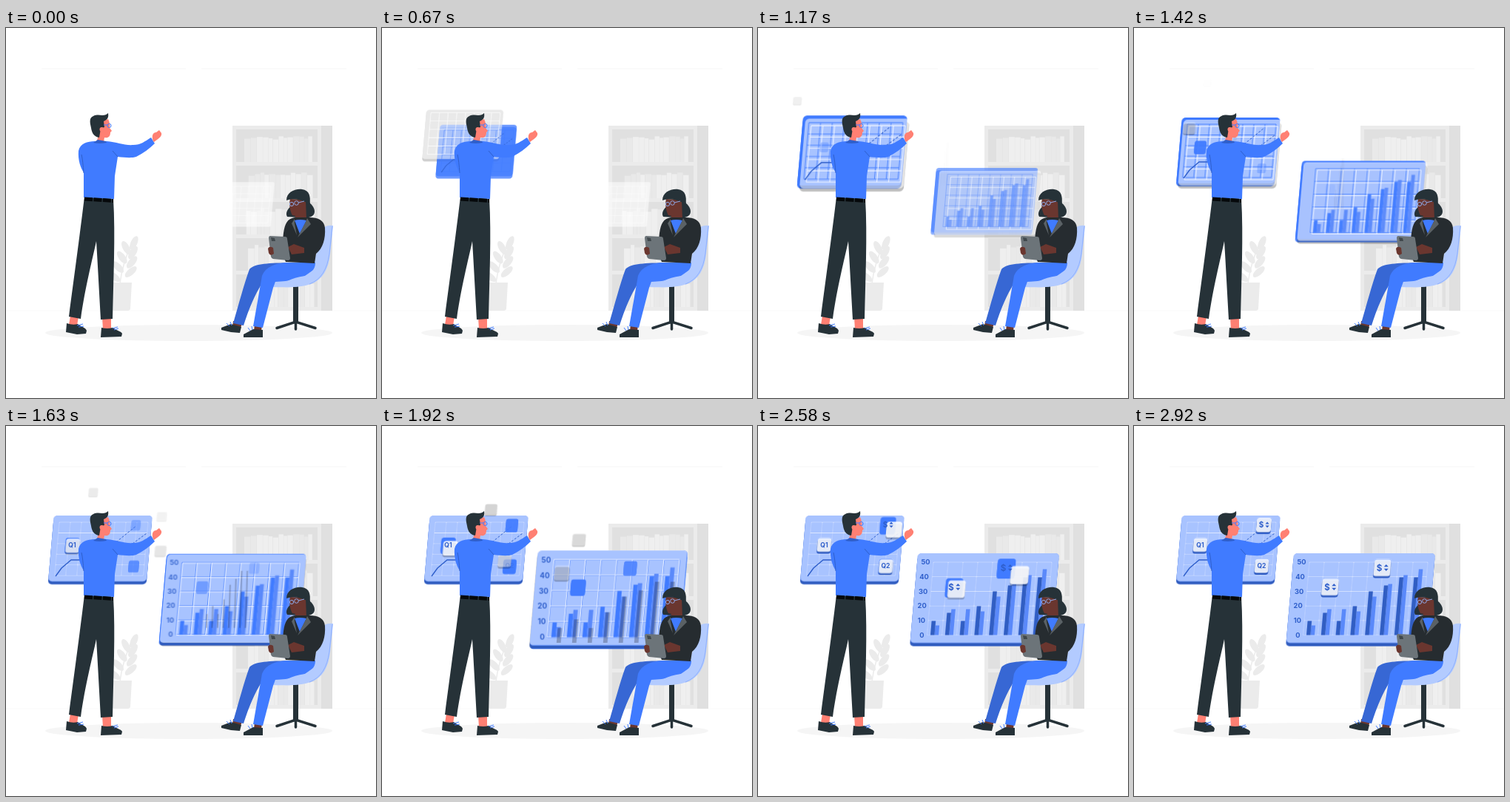
An HTML page that plays this animation: 500 by 500 pixels, repeating every 2960 ms.

```html
<!DOCTYPE html>
<html lang="en">
<head>
<meta charset="utf-8">
<title>Team reviewing charts</title>
<style>
  html, body { margin: 0; width: 100%; height: 100%; overflow: hidden; background: #fff; }
  svg { display: block; width: 100vw; height: 100vh; }
  text { font-family: Inter, "Open Sans", sans-serif; font-weight: 700; fill: #2f5fcb; }
  .blue { fill: #407bff; }
  .dark { fill: #263238; }
  .skin { fill: #ff8073; }
  .brown { fill: #6a362f; }
  .line { fill: none; stroke: #2f5fcb; }
</style>
</head>
<body>
<svg viewBox="0 0 500 500">
  <g id="room">
    <path d="M48 55H243M264 55H460" stroke="#f5f5f5"/>
    <path d="M0 382H500" stroke="#fafafa"/>
    <ellipse cx="247" cy="412" rx="194" ry="11" fill="#f5f5f5"/>
    <path d="M306 132H426V382H306Z" fill="#ebebeb"/>
    <path d="M426 132H441V382H426Z" fill="#e0e0e0"/>
    <g id="shelves"></g>
    <g id="plant" fill="#ebebeb">
      <path d="M141 344H170L168 379Q168 382 164 382H147Q143 382 143 379Z"/>
      <path d="M154 345Q157 320 170 290" fill="none" stroke="#ebebeb" stroke-width="1.5"/>
    </g>
  </g>
  <g id="left"></g>
  <g id="man">
    <path class="skin" d="M87 389L85 401 96 402 98 390ZM130 391L131 407 142 407 142 391Z"/>
    <path class="dark" d="M106 228C101 270 93 330 85 390L101 393C107 350 117 312 122 288C124 320 126 360 128 394L144 393C145 340 148 280 145 231Z"/>
    <path class="dark" d="M82 399Q90 402 97 400C102 404 108 405 109 409L108 413 96 414 81 411ZM129 405Q137 407 144 405C150 409 156 410 157 413L156 417 128 418Z"/>
    <path d="M96 402L104 400M98 404L105 403M144 406L151 404M146 408L152 406" stroke="#407bff"/>
    <path class="skin" d="M122 155L126 142V128L138 123C140 127 141 132 140 135L143 139 141 141C141 147 138 149 133 148L132 154Z"/>
    <path class="dark" d="M114 123C117 117 124 117 130 118C134 118 136 117 138 115C139 121 137 124 132 126L133 134 128 136 126 148C119 147 116 142 115 135C114 130 113 127 114 123Z"/>
    <circle class="skin" cx="129.500" cy="137" r="3"/>
    <path d="M132 131H137" stroke="#407bff"/>
    <circle cx="139.500" cy="132" r="2.600" fill="none" stroke="#407bff"/>
    <path class="blue" d="M120 153C110 153 100 156 98 166C97 178 101 190 105 195V229L146 231 147 200 151 174C160 175 170 176 176 174C186 169 194 163 201 156L196 148C188 153 182 158 172 158C160 159 150 154 136 153Z"/>
    <path d="M118 155L124 151 135 153 136 155Q126 157 118 155Z" fill="#2f5fcb"/>
    <path class="line" d="M105 196Q104 180 102 171M151 174L144 166"/>
    <path class="skin" d="M199 153C196 145 199 141 203 141L207 138 210 142C211 146 207 149 204 151L200 154Z"/>
    <path d="M106 231L145 233.500" stroke="#05080a" stroke-width="5" stroke-dasharray="11 1.500"/>
  </g>
  <g id="right"></g>
  <g id="woman">
    <path d="M391.500 346V398" stroke="#263238" stroke-width="7"/>
    <path d="M366 405.500L391.500 397 418 405.500M391.500 397V407" fill="none" stroke="#263238" stroke-width="3.500" stroke-linecap="round"/>
    <path d="M430 269Q436 266 442 267L438 305C436 326 428 340 412 346C400 350 385 351 361 350C362 343 368 340 380 336L415 320Z" fill="#b3cbff"/>
    <path d="M441 268L437 305C434 326 426 340 410 346" fill="none" stroke="#8eb0ff"/>
    <path class="brown" d="M307 396L306 404 317 405 320 397ZM336 400L335 410 345 410 346 400Z"/>
    <path d="M380 317C350 318 335 319 329 326C322 345 314 375 307 399L321 402C328 380 336 361 346 345L375 335Z" fill="#3767d4"/>
    <path class="blue" d="M418 317H380C360 318 350 325 346 335L334 403 347 405 361 351 364 343C385 342 395 339 404 335C413 331 418 326 418 317Z"/>
    <path d="M375 350Q374 340 404 335L418 325 425 334Q410 352 375 350Z" fill="#b3cbff"/>
    <path class="dark" d="M291 405L304 400 318 404 316 412 304 411 291 408ZM321 414L334 407 347 408V418H321Z"/>
    <path d="M302 403L298 399M305 402L303 397M330 409L327 405M333 408L332 403" stroke="#407bff"/>
    <path class="dark" d="M404 221C412 224 410 232 411 237C415 240 419 247 416 252C411 258 402 256 396 256L380 255C377 250 381 244 385 241Z"/>
    <path class="brown" d="M384 231C382 238 384 248 387 253L391 254 390 261 399 266 406 259 405 232Z"/>
    <path class="dark" d="M379 233C379 222 390 217 400 218C410 219 412 228 410 237L404 235C396 231 386 230 379 233Z"/>
    <g fill="none" stroke="#8ea9e8"><circle cx="386" cy="238" r="2.600"/><circle cx="392.500" cy="236.500" r="2.800"/><path d="M395 236L403 234"/></g>
    <path d="M390 256C380 258 377 264 375 277L372 302 378 316 417 318 419 305C428 298 432 285 431 270C430 260 422 256 410 256Z" fill="#262c30"/>
    <path class="blue" d="M390 260Q397 258 406 260L397 278Z"/>
    <path d="M407 257L412 265 394 283 405 262ZM390 258L386 264 393 280 390 264Z" fill="#5a6165"/>
    <path class="brown" d="M381 296L389 292 403 297 403 304 386 306Z"/>
    <path d="M357 281L377 282Q380 282 380 285L384 311Q384 314 381 314L361 312Q359 312 358 309L355 284Q355 281 357 281Z" fill="#6c7479"/>
    <path d="M358 283L363 284 364 288 359 288Z" fill="#40484c"/>
    <path class="brown" d="M354 298Q356 294 361 297L362 305Q357 309 355 304Z"/>
  </g>
</svg>
<script>
const LOOP = 2960, PEAK = .757, BLUE = '#407bff';
const GO = 'cubic-bezier(.4,.4,.7,1)', BACK = 'ease-in-out';
const $ = id => document.getElementById(id);
const sheet = document.head.appendChild(document.createElement('style'));
const group = (cls, art) => `<g class="${cls}">${art}</g>`;
let count = 0;

// Keyframes at the given shares of a span; css[i] holds at shares[i].
function track({ start, span }, shares, css, origin = [0, 0]) {
  const name = 'k' + count++;
  const pct = share => ((start + share * span) / LOOP * 100).toFixed(3);
  const steps = css.map((rule, i) =>
    `${pct(shares[i])}%{${rule};animation-timing-function:${i ? BACK : GO}}`);
  sheet.textContent += `@keyframes ${name}{0%{${css[0]}}${steps.join('')}100%{${css[css.length - 1]}}}` +
    `.${name}{animation:${name} ${LOOP}ms infinite;transform-origin:${origin[0]}px ${origin[1]}px}`;
  return name;
}

// Every part overshoots once, then settles.
const swing = (time, values, origin) => track(time, [0, PEAK, 1], values.map(v => 'transform:' + v), origin);
const grow = (time, origin) => swing(time, ['scale(.5)', 'scale(1.06)', 'none'], origin);
const fly = (time, dx, dy) =>
  swing(time, [`translate(${dx}px,${dy}px)`, `translate(${-.12 * dx}px,${-.12 * dy}px)`, 'none']);
const fade = (time, from, to, low = 0) => track(time, [from, to], [`opacity:${low}`, 'opacity:1']);

const lean = (x, y, art) => `<g transform="translate(${x} ${y}) skewX(-5)">${art}</g>`;
const rect = (x, y, w, h, fill, r = 0, a = 1) =>
  `<rect x="${x}" y="${y}" width="${w}" height="${h}" rx="${r}" fill="${fill}" fill-opacity="${a}"/>`;

function gridPath(x, y, cols, rows, dx, dy) {
  let d = '';
  for (let i = 0; i <= cols; i++) d += `M${x + i * dx} ${y}v${rows * dy}`;
  for (let i = 0; i <= rows; i++) d += `M${x} ${y + i * dy}h${cols * dx}`;
  return d;
}

// A slab whose blue parts grow in place while tints drift over them.
function board({ x, y, w, h, depth, time, drift, grid, art }) {
  const size = grow(time, [x + w / 2 + 4, y - h / 2]);
  const show = fade(time, 0, .5);
  const shift = fly({ start: time.start, span: time.span * 1.15 }, ...drift);
  const still = part => group(size, group(show, part));
  const tint = part => group(shift, group(size, part));
  const slab = (dy, fill, a) => lean(x, y, rect(0, dy - h, w, h, fill, 5, a));
  const lines = color => lean(x, y, `<path d="${grid}" fill="none" stroke="${color}" stroke-opacity=".85"/>`);
  return still(slab(depth, BLUE)) + tint(group(show, slab(depth, '#000', .25))) +
    still(slab(0, BLUE)) + tint(slab(0, '#fff', .54)) +
    still(lines(BLUE)) + tint(lines('#fff')) + still(art);
}

function chip({ x, y, size, label, start, span, from }) {
  const time = { start, span }, k = size / 20;
  const tile = (dy, fill, a) => lean(x, y, rect(-size / 2, dy - size / 2, size, size, fill, 3.5, a));
  const arrow = dir => `<path d="M${x + 2 * k} ${y + dir * k}h${5.2 * k}l${-2.6 * k} ${dir * 3 * k}z" fill="#2f5fcb"/>`;
  const sign = label === '$'
    ? `<text x="${x - 3.5 * k}" y="${y + 3.5 * k}" font-size="${10 * k}" text-anchor="middle">$</text>` + arrow(-1) + arrow(1)
    : `<text x="${x}" y="${y + 3}" font-size="8.500" text-anchor="middle">${label}</text>`;
  const pop = part => group(grow(time, [x, y]), group(fade(time, 0, .45), part));
  return pop(tile(2.5, BLUE) + tile(0, BLUE)) +
    group(fly(time, ...from), pop(tile(2.5, '#000', .25) + group(fade(time, .4, .65, .3), tile(0, '#fff', .87)))) +
    group(fade(time, .45, .6), sign);
}

// Bookcase and plant
let seed = 7;
const rand = () => (seed = seed * 16807 % 2147483647) / 2147483647;
let shelves = '';
for (let row = 0; row < 5; row++) {
  const top = 137 + row * 49;
  shelves += rect(311, top, 110, 44, '#e0e0e0');
  for (let x = 322 + rand() * 8; x < 413;) {
    const w = 4 + rand() * 5, tall = 30 + rand() * 5;
    shelves += rect(x, top + 44 - tall, w, tall, rand() < .5 ? '#e9e9e9' : '#efefef');
    x += w + .4;
  }
}
$('shelves').innerHTML = shelves;

for (let i = 0; i < 8; i++) {
  const side = i % 2 ? 1 : -1, y = 336 - i * 6.5, x = 157 + i * 1.7 + side * (11 - i);
  $('plant').innerHTML += `<ellipse cx="${x}" cy="${y}" rx="4.500" ry="10" transform="rotate(${side * (52 - i * 4)} ${x} ${y})"/>`;
}

// Line chart board
$('left').innerHTML =
  board({
    x: 57, y: 210, w: 133, h: 89, depth: 4, time: { start: 320, span: 1100 }, drift: [-35, -45],
    grid: gridPath(8, -80, 8, 5, 15, 14.4),
    art: '<path class="line" stroke-width="1.400" d="M67 203L75 192 88 181H105L125 172"/>' +
      '<path class="line" stroke-dasharray="3 2" d="M145 160L176 135M167 162L190 145"/>'
  }) +
  chip({ x: 89.5, y: 160.5, size: 19, label: 'Q1', start: 1040, span: 1000, from: [-46, -80] }) +
  chip({ x: 175.5, y: 133.5, size: 20, label: '$', start: 1400, span: 1450, from: [-78, -61] }) +
  chip({ x: 172.5, y: 189, size: 19, label: 'Q2', start: 1240, span: 1400, from: [-50, -55] });

// Bar chart board
const time = { start: 790, span: 1500 }, late = { start: 1100, span: 1100 }, middle = [306, 235];
const front = [19, 30, 19, 39, 59, 67, 78, 78], back = [13, 35, 35, 32, 52, 69, 81, 89];
const bars = (heights, dx, fill, a) =>
  lean(233 + dx, 282.5, heights.map((h, i) => rect(i * 19.8, -h, 5.5, h, fill, 0, a)).join(''));
const labels = [0, 1, 2, 3, 4, 5].map(i =>
  `<text x="${224.5 + i * 1.6}" y="${285.7 - i * 19.7}" font-size="9.300" text-anchor="end">${i * 10}</text>`).join('');
const unfold = track(late, [.4, .7], ['transform:scaleX(.1)', 'transform:none'], middle);

$('right').innerHTML =
  board({
    x: 205.5, y: 293, w: 191, h: 121, depth: 4.5, time, drift: [7, 6],
    grid: gridPath(22, -109, 8, 5, 20, 19.7),
    art: bars(front, 0, BLUE) + bars(back, 5.5, '#5a89fa') + group(fade(time, .45, .6), labels)
  }) +
  group(fly(late, -60, -65), group(unfold, group(grow(time, middle),
    group(fade(late, 0, .7), bars(front, 0, '#000', .24))))) +
  chip({ x: 265, y: 217.5, size: 23, label: '$', start: 1360, span: 1350, from: [-85, -75] }) +
  chip({ x: 335.5, y: 191.5, size: 23, label: '$', start: 1480, span: 1440, from: [-150, -84] });
</script>
</body>
</html>
```
